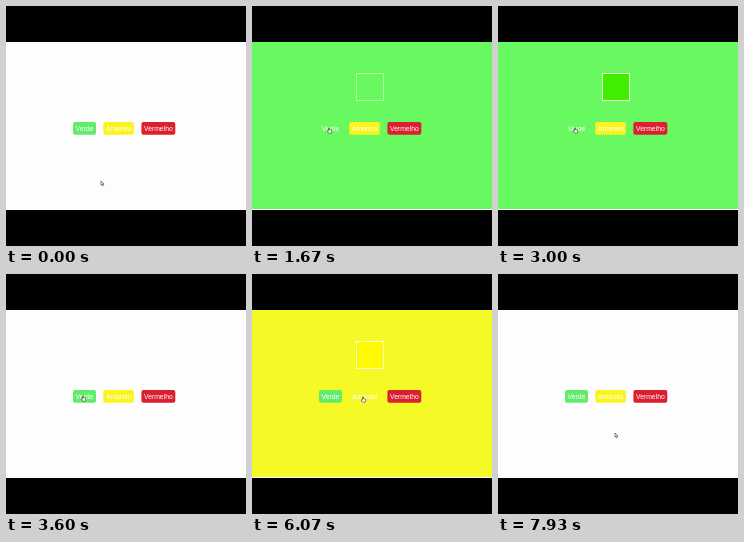
Recreate the animation shown at these times as an HTML page. Size 240x240 px, loop 8000 ms.

```html
<!DOCTYPE html>
<html lang="pt">
<head>
<meta charset="utf-8">
<style>
html, body { margin: 0; width: 100%; height: 100%; overflow: hidden; background: #000; }
svg { display: block; width: 100vw; height: 100vh; }
text { font: 6.8px "Liberation Sans", Arial, sans-serif; fill: #fff; text-anchor: middle; }
</style>
</head>
<body>
<svg viewBox="0 0 240 240">
  <rect y="36" width="240" height="168" fill="#fdfdfd"/>
  <g id="green">
    <rect y="36" width="240" height="167" fill="#68f860"/>
    <rect class="box" x="104.5" y="67.5" width="27" height="27" fill="#42ee00"/>
  </g>
  <g id="yellow">
    <rect y="36" width="240" height="167" fill="#f5fa26"/>
    <rect class="box" x="104.5" y="67.5" width="27" height="27" fill="#fffa00"/>
  </g>
  <rect id="frame" x="104.5" y="67.5" width="27" height="27" fill="none" stroke="#fbfde0"/>
  <g id="buttons"></g>
  <g id="cursor" stroke="#333" stroke-width=".6" stroke-linejoin="round">
    <path id="arrow" fill="#fff" d="M0 0V4.2L1 3.4L1.7 4.8L2.3 4.5L1.7 3.1H3Z"/>
    <path id="hand" fill="#fff" d="M0 0Q.6-.7 1 0V1.7L3.2 2.2V4L2.6 5.2H.2L-1.4 3Q-1 2.2 0 3Z"/>
  </g>
</svg>
<script>
const LOOP = 8000;
const $ = id => document.getElementById(id);

const buttons = [
  ["Verde", 67, 23, "#62ec6c"],
  ["Amarelo", 97.3, 30.5, "#faf41c"],
  ["Vermelho", 135.4, 33.9, "#dc2030"]
];
$("buttons").innerHTML = buttons.map(([label, x, w, color]) =>
  `<rect x="${x}" y="116" width="${w}" height="12.7" rx="2" fill="${color}"/>
   <text x="${x + w / 2}" y="125">${label}</text>`).join("");
const buttonRects = $("buttons").querySelectorAll("rect");

// Each light: background on at `on`, box filled from `fill`, all cleared at `off`.
const lights = [
  { group: $("green"), rect: buttonRects[0], on: 1100, fill: 1700, off: 3300 },
  { group: $("yellow"), rect: buttonRects[1], on: 4800, fill: 5350, off: 7150 }
];

// Pointer stops: time, x, y
const stops = [
  [0, 95, 175], [150, 95, 175], [900, 76.5, 122], [3700, 76.5, 122],
  [4450, 110.5, 123], [7350, 110.5, 123], [7850, 117, 159], [8000, 117, 159]
];

const ramp = (t, start, length) => Math.max(0, Math.min(1, (t - start) / length));
const ease = p => p * p * (3 - 2 * p);

function pointerAt(t) {
  const i = stops.findIndex(stop => stop[0] > t);
  const [t0, x0, y0] = stops[i - 1], [t1, x1, y1] = stops[i];
  const p = ease((t - t0) / (t1 - t0));
  return [x0 + (x1 - x0) * p, y0 + (y1 - y0) * p];
}

function draw(t) {
  let frameOpacity = 0;
  for (const { group, rect, on, fill, off } of lights) {
    const level = ease(ramp(t, on, 250)) * (1 - ease(ramp(t, off, 200)));
    const filled = ramp(t, fill, 300);
    group.setAttribute("opacity", level);
    group.querySelector(".box").setAttribute("opacity", filled);
    rect.setAttribute("opacity", 1 - level);
    frameOpacity = Math.max(frameOpacity, level * (0.5 + 0.4 * filled));
  }
  $("frame").setAttribute("opacity", frameOpacity);

  const [x, y] = pointerAt(t);
  const hovering = y > 114 && y < 129 &&
    buttons.some(([, left, width]) => x > left && x < left + width);
  $("cursor").setAttribute("transform", `translate(${x} ${y})`);
  $("hand").style.display = hovering ? "" : "none";
  $("arrow").style.display = hovering ? "none" : "";
}

const start = performance.now();
function tick() {
  draw((performance.now() - start) % LOOP);
  requestAnimationFrame(tick);
}
tick();
</script>
</body>
</html>
```
